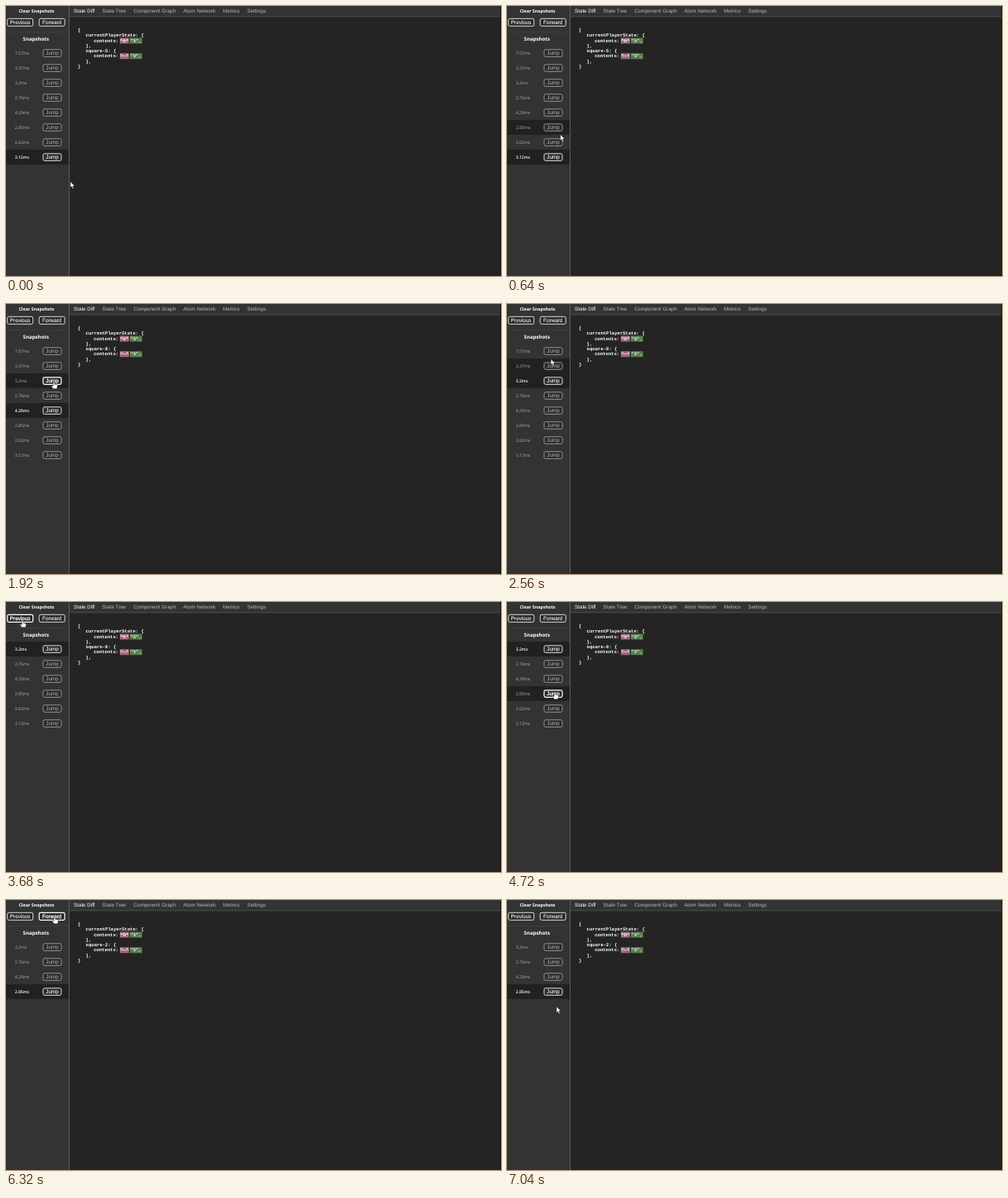
Recreate the animation shown at these times as an HTML page. Size 600 by 327 pixels, loop 7120 ms.

```html
<!DOCTYPE html>
<html lang="en">
<head>
<meta charset="utf-8">
<title>Snapshots</title>
<style>
html, body { margin: 0; width: 100%; height: 100%; overflow: hidden; background: #242424; }
svg { display: block; width: 600px; height: 327px; }
text { font: 6.25px "Liberation Sans", Arial, sans-serif; text-rendering: geometricPrecision; white-space: pre; }
.head { font: bold 5.4px "Open Sans", sans-serif; fill: #fff; text-anchor: middle; }
.sub { font-size: 6.1px; }
.time { font: 5.2px "Open Sans", sans-serif; }
.on { font-weight: 600; font-size: 5.05px; }
.btn { font-size: 6.35px; text-anchor: middle; }
.code { font: bold 5.6px "Liberation Mono", "Courier New", monospace; fill: #fff; }
.old { fill: #fbe6ec; text-decoration: line-through; }
.new { fill: #e8f4e0; }
</style>
</head>
<body>
<svg id="stage" viewBox="0 0 600 327"></svg>
<script>
const LOOP = 7120, STEP = 80, ROW = 18, TOP = 48;
const stage = document.getElementById("stage");
const times = ["7.57", "3.37", "3.2", "2.76", "4.29", "2.85", "2.62", "3.12"];
const tabs = ["State Diff", "State Tree", "Component Graph", "Atom Network", "Metrics", "Settings"];
const squares = { 2: 0, 4: 8, 5: 2, 7: 5 }; // square played in each snapshot shown

// Places the pointer visits
const jump = row => [58, TOP + ROW * row + 7];
const clear = [41, 5], previous = [20, 22], forward = [59, 20], rest = [60, 129];

// Each move: start, end, destination
const moves = [
  [0, 960, jump(4)], [1120, 1360, jump(3)], [1520, 2000, jump(2)],
  [2240, 3360, clear], [3600, 3680, previous], [3840, 4560, jump(3)],
  [4960, 6240, clear], [6240, 6320, forward], [6480, 7040, rest],
];

const selectedAt = t => t < 1040 ? 7 : t < 2240 ? 4 : t < 4800 ? 2 : 5;

function pointerAt(t) {
  let [x, y] = [78, 212.5];
  for (const [start, end, [tx, ty]] of moves) {
    const p = Math.min(1, Math.max(0, (t - start) / (end - start)));
    x += (tx - x) * p;
    y += (ty - y) * p;
  }
  return [x, y];
}

const rect = (x, y, w, h, fill, more = "") =>
  `<rect x="${x}" y="${y}" width="${w}" height="${h}" fill="${fill}" ${more}/>`;
const text = (s, x, y, cls = "", more = "") => `<text x="${x}" y="${y}" class="${cls}" ${more}>${s}</text>`;

function button(label, x, y, w, h, color, hot) {
  const ink = hot ? "#fff" : color;
  return rect(x, y, w, h, "#282828", `rx="1.8" stroke="${ink}" stroke-width="${hot ? 1.2 : 0.9}"`) +
    text(label, x + w / 2, y + h / 2 + 2.2, "btn",
      `fill="${ink}" stroke="${ink}" stroke-width="${hot ? 0.25 : 0.1}"`);
}

function mainPanel(snapshot) {
  const [player, next] = snapshot % 2 ? ["O", "X"] : ["X", "O"];
  const lineY = n => 31 + n * 6.25;
  const line = (s, indent, n) => text(s, 87 + indent * 9.6, lineY(n), "code");
  const diff = (before, after, n) => line("contents:", 2, n) +
    rect(138, lineY(n) - 5, 11, 7, "#a06a7a") + text(`"${before}"`, 138.5, lineY(n), "code old") +
    rect(150, lineY(n) - 5, 15, 7, "#5b7b50") + text(`"${after}",`, 150.8, lineY(n), "code new");
  const tabText = tabs.map((s, i) => `<tspan dx="${i && 9}" fill="${i ? "#b8b8b8" : "#fff"}">${s}</tspan>`);
  return rect(77, 0, 523, 12.5, "#333") + rect(77, 12.4, 523, 0.9, "#555") +
    text(tabText.join(""), 82, 8) +
    line("{", 0, 0) +
    line("currentPlayerState: {", 1, 1) + diff(player, next, 2) + line("},", 1, 3) +
    line(`square-${squares[snapshot]}: {`, 1, 4) + diff("-", player, 5) + line("},", 1, 6) +
    line("}", 0, 7);
}

function draw(t) {
  const selected = selectedAt(t), [px, py] = pointerAt(t);
  const first = t < 3680 ? 0 : 2, end = t < 6320 ? 8 : 6;
  const over = (x, y, w, h) => px >= x && px < x + w && py >= y && py < y + h;
  let hand = over(14, 2, 46, 8);
  const hotButton = (label, x, y, w, h, color) => {
    const hot = over(x, y, w, h);
    hand = hand || hot;
    return button(label, x, y, w, h, color, hot);
  };

  let out = rect(0, 0, 600, 327, "#242424") + mainPanel(selected) + rect(599, 0, 1, 327, "#111") +
    rect(0, 0, 76, 327, "#333") + rect(0, 31, 76, 1, "#3e3e3e") + rect(76, 0, 1, 327, "#5c5c5c") +
    text("Clear Snapshots", 37, 8, "head") +
    hotButton("Previous", 1.7, 15.3, 31, 9, "#eee") +
    hotButton("Forward", 40.2, 15.3, 31, 9, "#eee") +
    text("Snapshots", 36.3, 41.7, "head sub");

  times.slice(first, end).forEach((ms, i) => {
    const y = TOP + i * ROW, on = first + i === selected;
    if (on || over(0, y, 76, ROW)) out += rect(0, y, 76, ROW, "#212121");
    out += text(ms + "ms", 10.7, y + 10.8, on ? "time on" : "time", `fill="${on ? "#fff" : "#b0b0b0"}"`) +
      hotButton("Jump", 45, y + 4.8, 22, 8.5, on ? "#f4f4f4" : "#a2a2a2");
  });

  const shape = hand
    ? "M-.9 .6Q0-.6 .9 .6V3.2L3.6 3.8Q4.6 4.1 4.4 5.2L3.8 8.8H-.8L-3.2 5.4Q-2.6 4.2-.9 5.6Z"
    : "M0 0V7.6L1.7 6.1L2.9 8.9L4.2 8.3L3 5.6H5.3Z";
  out += `<path d="${shape}" transform="translate(${px} ${py})" fill="#fff" stroke="#111" stroke-width=".5"/>`;
  stage.innerHTML = out;
}

let shown = -1;
function tick() {
  const t = Math.floor(performance.now() % LOOP / STEP) * STEP;
  if (t !== shown) draw(shown = t);
  requestAnimationFrame(tick);
}
tick();
</script>
</body>
</html>
```
